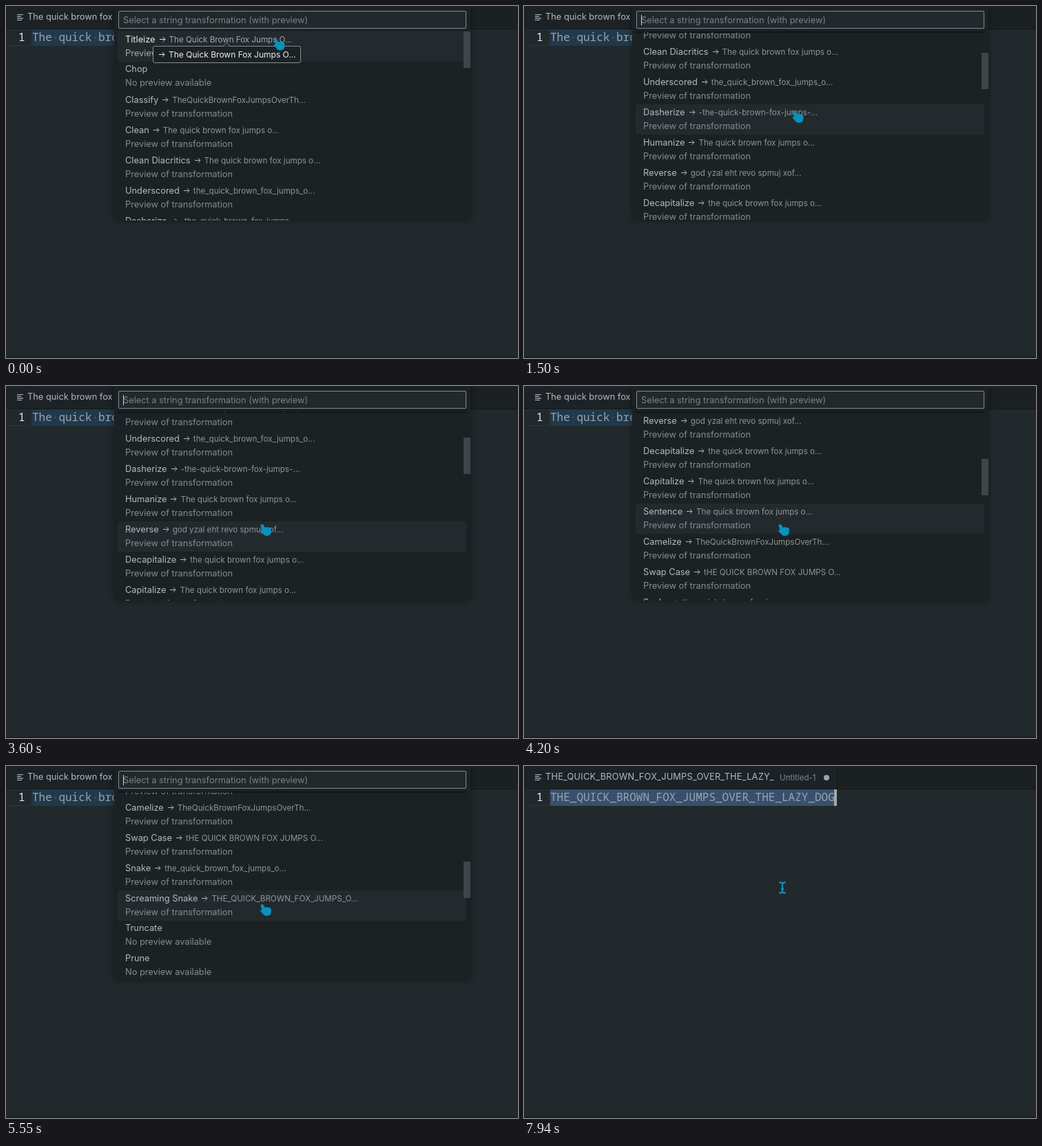
These frames come from a looping animation (743 by 512 pixels, 8 s). An HTML page:

```html
<!DOCTYPE html>
<html lang="en">
<head>
<meta charset="utf-8">
<title>String transformations</title>
<style>
  html, body { margin: 0; width: 100%; height: 100%; overflow: hidden; background: #22292c; }
  body { position: relative; font: 12.8px/20px Inter, sans-serif; color: #b3babd; }
  div, #tab span, #overlay { position: absolute; white-space: pre; }
  #bar { left: 0; top: 0; width: 743px; height: 33px; background: #1b2023; border-bottom: 1px solid #14191b; }
  #tab { left: 0; top: 0; width: 454px; height: 33px; background: #1c2225; border-right: 1px solid #13181a; }
  #name { left: 31px; top: 6px; }
  #name.caps { letter-spacing: .2px; }
  #file { left: 371px; top: 7px; font-size: 11.6px; color: #81888b; }
  #dirty { left: 435px; top: 12.5px; width: 8px; height: 8px; border-radius: 50%; background: #a0a7aa; }
  #gutter { left: 0; top: 34px; width: 36px; height: 22px; border: solid #2c3437; border-width: 1px 1px 1px 0; }
  #number, #line { top: 34px; height: 24px; font: 16px/22px "Noto Sans Mono", monospace; }
  #number { left: 18px; color: #e4e8ea; }
  #line { left: 38px; width: 412px; color: #98a5ab; }
  #line i { font-style: normal; color: #53636d; }
  #caret { left: 450px; top: 34px; width: 4px; height: 24px; background: #a1a9ad; }
  #foot { left: 0; top: 510px; width: 743px; height: 2px; background: #1a2022; }
  #picker { left: 157px; top: 0; width: 517px; height: 312px; background: #1c2124; border-radius: 0 0 5px 5px; box-shadow: 0 0 8px rgba(0, 0, 0, .4); }
  #input { left: 6px; top: 7px; width: 503px; height: 24px; border: 1px solid #858c8f; border-radius: 2px; background: #22292c; color: #7c8386; line-height: 25px; text-indent: 6px; }
  #beam { left: 6px; top: 5px; width: 1px; height: 15px; background: #c8cdcf; }
  #list { left: 0; top: 37px; width: 517px; height: 275px; overflow: hidden; border-radius: 0 0 5px 5px; }
  .row { left: 5px; width: 506px; height: 44px; border-radius: 3px; }
  .row.hover { background: #232a2d; }
  .row div { left: 11px; }
  .title { top: 2px; }
  .sub { top: 22px; color: #858c8f; }
  .bare .title { top: 1px; }
  .bare .sub { top: 21px; }
  .title span { font-size: 11.6px; color: #8e9598; }
  .row:first-child .title { color: #e6eaeb; }
  .row:first-child :is(span, .sub) { color: #a3aaad; }
  .arrow { width: 9px; height: 9px; margin: 0 5px 0 6px; fill: none; stroke: currentColor; }
  #shade { left: 5px; top: 0; width: 506px; height: 3px; background: linear-gradient(#0c1012, transparent); }
  #thumb { left: 507px; width: 10px; height: 53px; background: #3f4548; }
  #tip { left: 213px; top: 58px; width: 213px; height: 23px; border: 1px solid #868d90; border-radius: 3px; background: #1c2124; color: #eef1f2; font-size: 12px; line-height: 24px; }
  #tip .arrow { margin: 0 5px 0 8px; }
  #overlay { left: 0; top: 0; }
</style>
</head>
<body>
<div id="bar"></div>
<div id="tab">
  <span id="name"></span><span id="file">Untitled-1</span><div id="dirty"></div>
</div>
<div id="gutter"></div>
<div id="number">1</div>
<div id="line"></div>
<div id="caret"></div>
<div id="foot"></div>
<div id="picker">
  <div id="input">Select a string transformation (with preview)<div id="beam"></div></div>
  <div id="list"><div id="rows"></div><div id="shade"></div><div id="thumb"></div></div>
</div>
<div id="tip"></div>
<svg id="overlay" width="743" height="512" fill="none">
  <path d="M16 12.5h9M16 15.200h6M16 17.800h9M16 20.500h7" stroke="#b3babd" stroke-width="1.2"/>
  <path id="notch" d="M315 58.5l5-5 5 5" fill="#1c2124" stroke="#868d90"/>
  <path id="hand" fill="#0b91bd" d="M-1.5 2.5Q-1.5 0 1 0Q2.6 .2 3.5 2.5L4.5 4.8Q9.500 3 13.500 6Q14.500 9 13.500 13Q13 16.500 8 17Q3.500 17 1.500 13.500L-1.500 10.500Q-2.500 8 .5 8Z"/>
  <path id="ibeam" stroke="#0b91bd" stroke-width="2.3" d="M370.500 169.500h2.500l2 1.500 2-1.500h2.500M375 171v12M370.500 184.500h2.500l2-1.500 2 1.500h2.500M373 179h4"/>
</svg>
<script>
const $ = id => document.getElementById(id);
const LOOP = 8000, STEP = 150, ROW = 44, TOP = 37;
const CLOSE = 6300;  // the choice is made and the picker goes away

const arrow = '<svg class="arrow" viewBox="0 0 9 9"><path d="M0 4.500h8M4.800 1.300L8 4.500 4.800 7.700"/></svg>';
const plain = 'The quick brown fox jumps o...';
const snake = 'the_quick_brown_fox_jumps_o...';
const joined = 'TheQuickBrownFoxJumpsOverTh...';
const titled = 'The Quick Brown Fox Jumps O...';
const items = [
  ['Titleize', titled], ['Chop'], ['Classify', joined], ['Clean', plain],
  ['Clean Diacritics', plain], ['Underscored', snake],
  ['Dasherize', '-the-quick-brown-fox-jumps-...'], ['Humanize', plain],
  ['Reverse', 'god yzal eht revo spmuj xof...'],
  ['Decapitalize', 'the quick brown fox jumps o...'], ['Capitalize', plain],
  ['Sentence', plain], ['Camelize', joined],
  ['Swap Case', 'tHE QUICK BROWN FOX JUMPS O...'], ['Snake', snake],
  ['Screaming Snake', snake.toUpperCase()], ['Truncate'], ['Prune'], ['Repeat']
];
$('rows').innerHTML = items.map(([title, preview], i) =>
  `<div class="row${preview ? '' : ' bare'}" style="top:${i * ROW}px"><div class="title">${title}` +
  (preview ? `${arrow}<span>${preview}</span>` : '') +
  `</div><div class="sub">${preview ? 'Preview of transformation' : 'No preview available'}</div></div>`
).join('');
const rows = [...$('rows').children];
$('tip').innerHTML = arrow + titled;

const sentence = 'The quick brown fox jumps over the lazy dog';
const shout = sentence.toUpperCase().replaceAll(' ', '_');

// [time, value] points joined by straight lines
const scrollKeys = [[600, 0], [1500, 158], [1800, 192], [3600, 192], [3900, 250], [4200, 350],
  [4500, 418], [4800, 465], [4950, 473], [5100, 473], [5700, 530]];
const xKeys = [[300, 390.5], [900, 391.5], [2850, 391.5], [3450, 371]];
const yKeys = [[300, 47.5], [900, 153], [2850, 153], [3450, 201], [6000, 201], [6300, 177]];
const caretKeys = [[7050, 1], [7200, .5], [7350, 0], [7500, 0], [7650, .25], [7800, .7], [7950, 1]];

function at(keys, t) {
  const n = keys.findIndex(k => k[0] > t);
  if (n < 0) return keys[keys.length - 1][1];
  if (n === 0) return keys[0][1];
  const [t0, a] = keys[n - 1], [t1, b] = keys[n];
  return a + (b - a) * (t - t0) / (t1 - t0);
}

const show = (id, on) => { $(id).style.visibility = on ? 'visible' : 'hidden'; };

let lastOpen;
function setText(open) {
  if (open === lastOpen) return;
  lastOpen = open;
  $('name').textContent = open ? sentence : shout.slice(0, 40);
  $('name').classList.toggle('caps', !open);
  $('line').innerHTML = open ? sentence.replaceAll(' ', '<i>·</i>') : shout;
}

function draw(time) {
  const t = Math.floor((time + (time >= 6590 ? 10 : 0)) / STEP) * STEP;
  const open = t < CLOSE;
  const scroll = Math.round(at(scrollKeys, t));
  const x = at(xKeys, t), y = at(yKeys, t);
  const blink = t % 1000;
  const hovered = Math.floor((y + 1 + scroll - TOP) / ROW);

  setText(open);
  for (const id of ['picker', 'hand']) $(id).style.display = open ? '' : 'none';
  for (const id of ['file', 'dirty', 'caret', 'ibeam']) show(id, !open);
  for (const id of ['tip', 'notch']) show(id, t < 450);
  $('beam').style.opacity = blink >= 450 && blink < 950 ? 1 : 0;
  $('caret').style.opacity = at(caretKeys, t);
  $('line').style.background = open ? '#22384b' : t < 6750 ? '#213f62' : '#38506e';

  $('rows').style.top = -scroll + 'px';
  rows.forEach((row, i) => row.classList.toggle('hover', i === hovered));
  show('shade', open && scroll > 0);
  $('thumb').style.top = Math.round(scroll * .198) + 'px';
  $('hand').setAttribute('transform', `translate(${x} ${y})`);
}

function frame() {
  draw(performance.now() % LOOP);
  requestAnimationFrame(frame);
}
frame();
</script>
</body>
</html>
```
